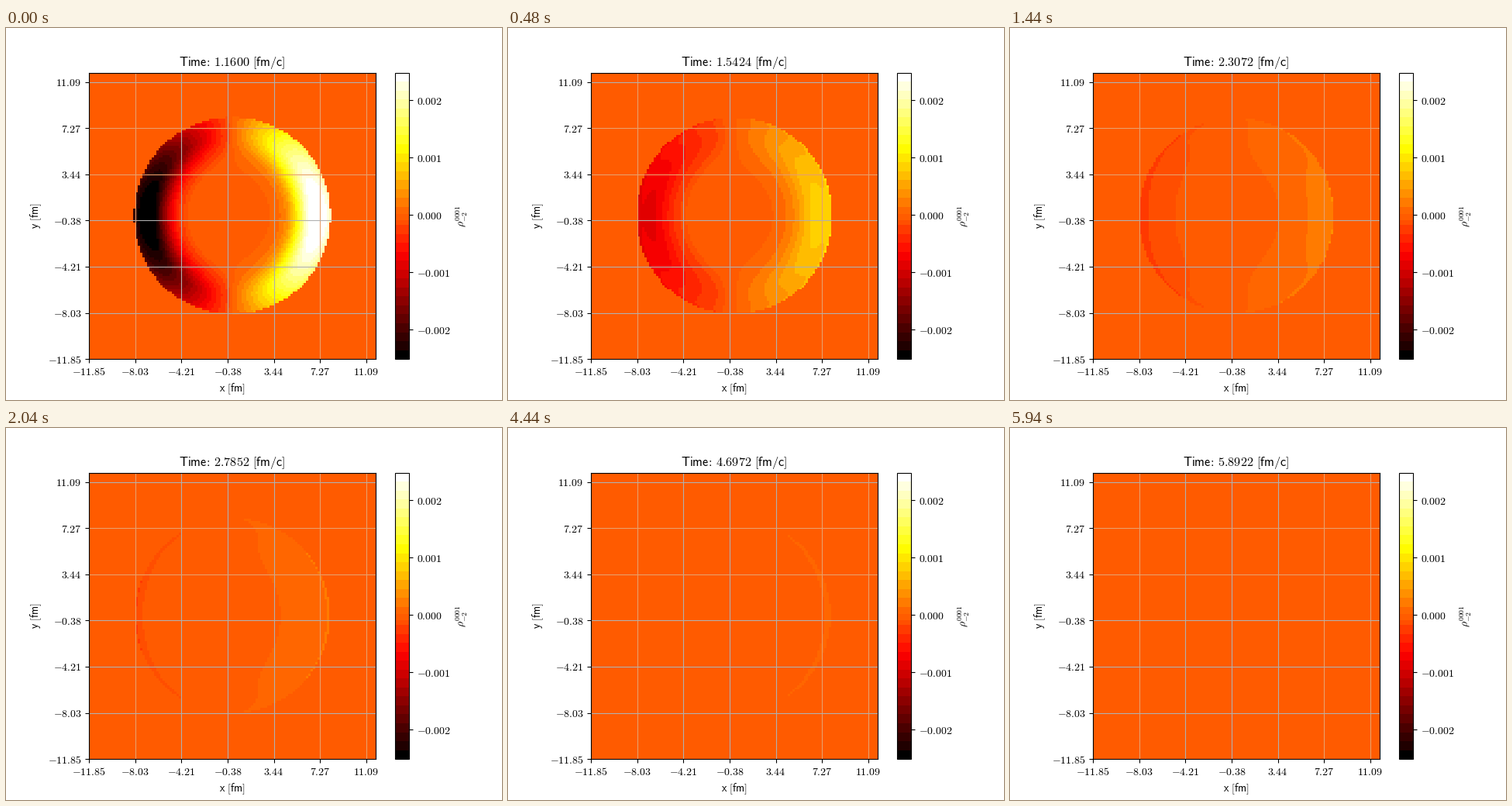
Animation, 640 px wide and 480 px high, one loop 6000 ms. Source, as a matplotlib script:

```python
import numpy as np
import matplotlib.pyplot as plt
from matplotlib.animation import FuncAnimation
from matplotlib.colors import ListedColormap

FRAMES, INTERVAL = 100, 60
T0, DT = 1.16, 0.0478
CELLS = 124
VMIN, VMAX = -0.00251, 0.00248

plt.rcParams["mathtext.fontset"] = "cm"


def banded_hot():
    """Hot colormap in 32 bands, with a separate band around zero."""
    hot = plt.get_cmap("hot")
    index = np.arange(256)
    colors = hot((index // 8) / 31)
    colors[0:8] = (0, 0, 0, 1)
    colors[124:130] = hot(128)
    return ListedColormap(colors)


axis = np.arange(CELLS) + 0.5 - CELLS / 2
X, Y = np.meshgrid(axis, axis)
R = np.hypot(X, Y)
COS = X / R


def field(t):
    """Dipole shell that decays in time, with a slower thin rim."""
    dt = t - T0
    radius = 42.575 - 0.21 * dt
    sigma = np.where(R < 36.2, 6.5 + 2.2 * dt, 10 + 3 * dt)
    shell = 0.0026 * (T0 / t) ** 4 * np.exp(-((R - 36.2) / sigma) ** 2 / 2)
    strength = 1.4e-4 * np.exp(-0.68 * (t - 2.785)) * (1 - np.exp(-dt / 0.12))
    depth = np.maximum(radius - R, 0)
    rim = strength * np.exp(-depth / (0.6 + 0.6 * dt))
    return np.where(R <= radius, (shell + rim) * COS, 0)


def sans(text):
    return r"$\mathsf{" + text.replace(" ", r"\ ") + "}$"


def title_text(t):
    return r"$\mathsf{Time\!:\,%.4f\ [fm/c]}$" % t


fig, ax = plt.subplots(figsize=(6.4, 4.8), dpi=100)
image = ax.imshow(field(T0), cmap=banded_hot(), vmin=VMIN, vmax=VMAX,
                  origin="lower", extent=(0, CELLS, 0, CELLS),
                  interpolation="nearest")

bar = fig.colorbar(image, ax=ax)
levels = [-0.002, -0.001, 0, 0.001, 0.002]
bar.set_ticks(levels, labels=[f"${v:.3f}$" for v in levels])
bar.set_label(r"$\rho_{-2}^{0001}$")

ticks = np.arange(0, CELLS, 20)
names = ["-11.85", "-8.03", "-4.21", "-0.38", "3.44", "7.27", "11.09"]
labels = [f"${n}$" for n in names]
ax.set_xticks(ticks, labels)
ax.set_yticks(ticks, labels)
ax.set_xlabel(sans("x [fm]"))
ax.set_ylabel(sans("y [fm]"))

ax.grid(True, color="#b0b0b0", linewidth=0.8)
for side, pale in ((ax.xaxis, (1, 5, 6)), (ax.yaxis, (4, 5))):
    lines = side.get_gridlines()
    for k in pale:
        lines[k].set_color("#e8a06c")

title = ax.set_title(title_text(T0), fontsize=11.7)


def update(i):
    t = T0 + DT * i
    image.set_data(field(t))
    title.set_text(title_text(t))
    return image, title


anim = FuncAnimation(fig, update, frames=FRAMES, interval=INTERVAL,
                     repeat=True, repeat_delay=0, blit=False)
plt.show()
```
